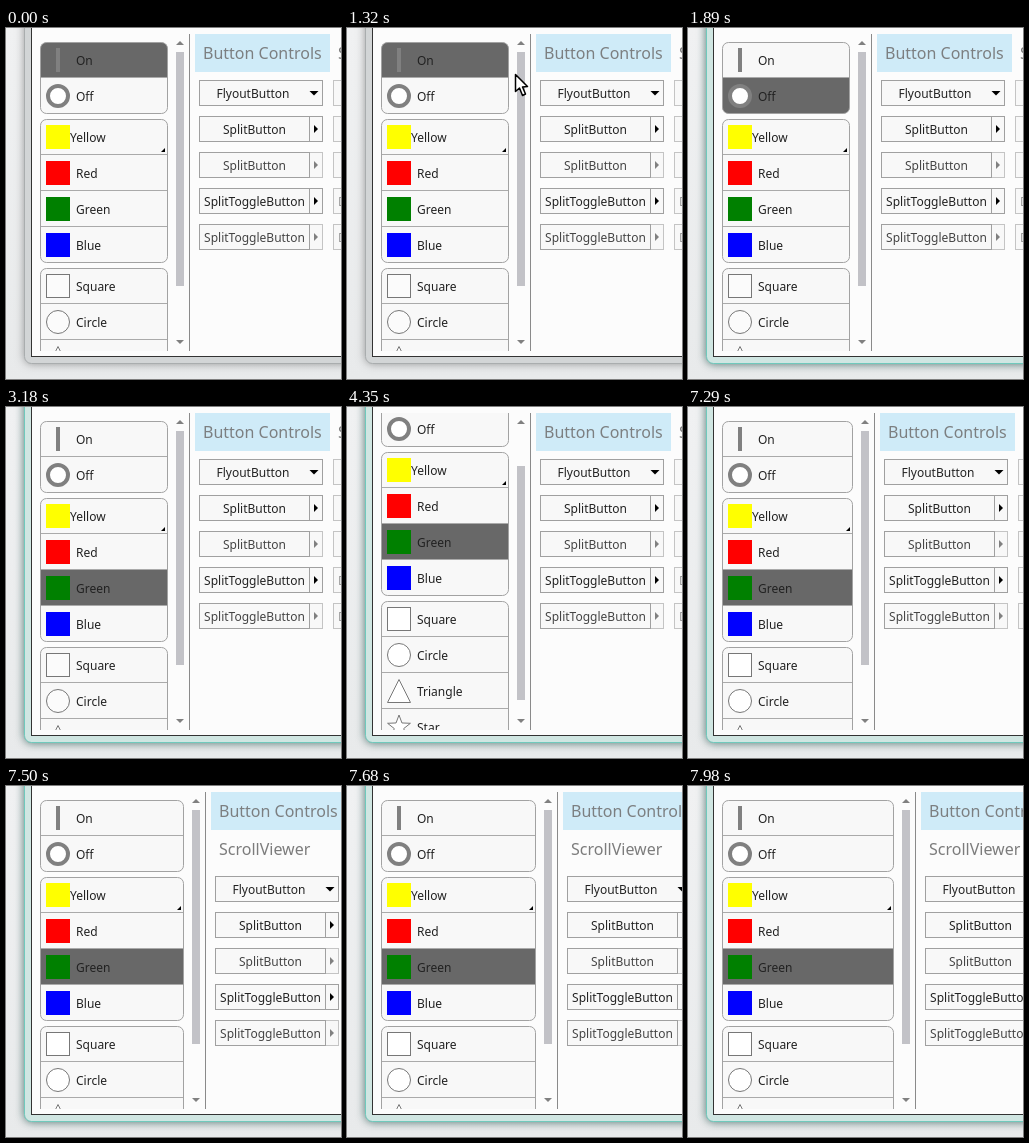
Write an HTML page with a canvas that moves like this. It is 335 px wide and 351 px high and loops after 8000 ms.

```html
<!DOCTYPE html>
<html lang="en">
<head>
<meta charset="utf-8">
<title>Control gallery</title>
<style>
  html, body { margin: 0; width: 100%; height: 100%; overflow: hidden; background: #ebedef; }
  canvas { display: block; }
</style>
</head>
<body>
<canvas id="stage" width="335" height="351"></canvas>
<script>
const ctx = document.getElementById('stage').getContext('2d');
const LOOP = 8000, TICK = 30, ROW = 36;
const FONT = '"Noto Sans", "Open Sans", sans-serif';
const INK = '#222';

const groups = [
  { top: 14, items: ['On', 'Off'] },
  { top: 91, items: ['Yellow', 'Red', 'Green', 'Blue'] },
  { top: 240, items: ['Square', 'Circle', 'Triangle', 'Star'] },
];
const swatches = { Yellow: '#ff0', Red: '#f00', Green: '#008000', Blue: '#00f' };
const buttons = [
  { label: 'FlyoutButton', flyout: true },
  { label: 'SplitButton' },
  { label: 'SplitButton', disabled: true },
  { label: 'SplitToggleButton' },
  { label: 'SplitToggleButton', disabled: true },
];

// Keys are [time, ...values]; values are interpolated linearly and held at both ends.
function track(keys, t) {
  if (t <= keys[0][0]) return keys[0].slice(1);
  for (let i = 1; i < keys.length; i++) {
    const a = keys[i - 1], b = keys[i];
    if (t < b[0]) {
      const p = (t - a[0]) / (b[0] - a[0]);
      return a.slice(1).map((v, k) => v + (b[k + 1] - v) * p);
    }
  }
  return keys[keys.length - 1].slice(1);
}

// Latest value whose start time has passed.
const latest = (keys, t) => keys.filter(k => k[0] <= t).pop()[1];

// Progress from 0 to 1 in equal jumps, the first one at the start time.
const steps = (t, start, gap, count) =>
  Math.max(0, Math.min(count, Math.floor((t - start) / gap) + 1)) / count;

function rect(x, y, w, h, fill) {
  ctx.fillStyle = fill;
  ctx.fillRect(x, y, w, h);
}

function outline(x, y, w, h, color) {
  ctx.strokeStyle = color;
  ctx.lineWidth = 1;
  ctx.strokeRect(x + .5, y + .5, w - 1, h - 1);
}

function shape(points, fill, stroke) {
  ctx.beginPath();
  points.forEach(([x, y]) => ctx.lineTo(x, y));
  ctx.closePath();
  if (fill) { ctx.fillStyle = fill; ctx.fill(); }
  if (stroke) { ctx.strokeStyle = stroke; ctx.lineWidth = 1; ctx.stroke(); }
}

function circle(x, y, r, width, stroke, fill) {
  ctx.beginPath();
  ctx.arc(x, y, r, 0, Math.PI * 2);
  if (fill) { ctx.fillStyle = fill; ctx.fill(); }
  ctx.strokeStyle = stroke;
  ctx.lineWidth = width;
  ctx.stroke();
}

function text(label, x, y, color = INK, size = 12, align = 'left') {
  ctx.font = `${size}px ${FONT}`;
  ctx.textAlign = align;
  ctx.fillStyle = color;
  ctx.fillText(label, x, y);
}

function frame(alpha, shadow, edge, strip) {
  ctx.save();
  ctx.globalAlpha = alpha;
  ctx.shadowColor = shadow;
  ctx.shadowBlur = 10;
  ctx.beginPath();
  ctx.roundRect(18.5, -20, 340, 355.5, 7);
  ctx.fillStyle = strip;
  ctx.fill();
  ctx.shadowColor = 'transparent';
  ctx.strokeStyle = edge;
  ctx.lineWidth = 1;
  ctx.stroke();
  ctx.restore();
}

function drawWindow(focus) {
  const desk = ctx.createLinearGradient(0, 0, 0, 351);
  desk.addColorStop(0, '#f0f1f2');
  desk.addColorStop(1, '#e8eaeb');
  rect(0, 0, 335, 351, desk);
  frame(1, 'rgba(0,0,0,.4)', '#a9adae', '#d2d5d6');
  if (focus) frame(focus, 'rgba(40,120,110,.5)', '#6fc9bc', '#d0e6e2');
  rect(25, 0, 310, 329, '#333');
  rect(26, 0, 309, 328, '#fcfcfc');
}

function drawIcon(name, y, solid) {
  const paper = solid ? '#fff' : '#fbfbfb';
  if (swatches[name]) rect(40, y + 6, 24, 24, swatches[name]);
  else if (name === 'On') rect(50, y + 6, 4, 24, '#808080');
  else if (name === 'Off') circle(52, y + 18, 10, 4, '#808080', '#fff');
  else if (name === 'Square') { rect(40, y + 6, 24, 24, paper); outline(40, y + 6, 24, 24, '#777'); }
  else if (name === 'Circle') circle(52, y + 18, 11.5, 1, '#777', paper);
  else if (name === 'Triangle') shape([[52, y + 6.5], [63.5, y + 29.5], [40.5, y + 29.5]], paper, '#777');
  else {
    const points = Array.from({ length: 10 }, (_, i) => {
      const r = i % 2 ? 5 : 12, a = i * Math.PI / 5;
      return [52 + r * Math.sin(a), y + 18 - r * Math.cos(a)];
    });
    shape(points, paper, '#777');
  }
}

function drawGroup({ top, items }, right, state) {
  const height = items.length * ROW;
  const border = () => {
    ctx.beginPath();
    ctx.roundRect(34.5, top + .5, right - 35, height - 1, 6);
  };
  ctx.save();
  border();
  ctx.clip();
  rect(34, top, right - 34, height, '#f8f8f8');
  items.forEach((name, i) => {
    const y = top + i * ROW;
    if (name === state.selected) rect(34, y, right - 34, ROW, '#686868');
    else if (name === state.hover) rect(34, y, right - 34, ROW, '#e6e6e6');
    if (i) rect(34, y - 1, right - 34, 1, '#aaa');
    drawIcon(name, y, state.solid);
    text(name, name === 'Yellow' ? 64 : 70, y + 23);
  });
  ctx.restore();
  border();
  ctx.strokeStyle = '#a2a2a2';
  ctx.lineWidth = 1;
  ctx.stroke();
  if (items[0] === 'Yellow') {
    const x = right - 3, y = top + 33;
    shape([[x, y - 4], [x, y], [x - 4, y]], '#000');
  }
}

function drawList(state) {
  const { shift, scroll } = state;
  ctx.save();
  ctx.beginPath();
  ctx.rect(26, 6, 309, 317);
  ctx.clip();
  ctx.save();
  ctx.translate(0, -scroll);
  groups.forEach(group => drawGroup(group, 162 + shift, state));
  ctx.restore();
  const x = 174 + shift;
  shape([[x - 4, 17], [x, 13], [x + 4, 17]], '#808080');
  shape([[x - 4, 312], [x, 316], [x + 4, 312]], '#808080');
  rect(x - 4, 24 + Math.round(scroll * .75), 8, 234, state.thumbHot ? '#a8a8ac' : '#c2c2c7');
  rect(x + 9, 6, 1, 317, '#8a8a8a');
  ctx.restore();
}

function drawButton({ label, flyout, disabled }, y) {
  const border = disabled ? '#c4c4c4' : '#a0a0a0';
  const arrow = disabled ? '#808080' : '#000';
  rect(193, y, 124, 26, '#f8f8f8');
  outline(193, y, 124, 26, border);
  if (flyout) {
    shape([[303.5, y + 11], [312.5, y + 11], [308, y + 15.5]], arrow);
  } else {
    outline(193, y, 111, 26, '#a0a0a0');
    shape([[308, y + 9], [312, y + 13], [308, y + 17]], arrow);
  }
  text(label, flyout ? 247 : 248.5, y + 18, disabled ? '#444' : INK, 12, 'center');
}

function drawPanel({ shift, wrapped }) {
  ctx.save();
  ctx.translate(shift, 0);
  rect(189, 6, 135, 38, '#cfebf8');
  text('Button Controls', 197, 31, '#7c7f81', 16);
  text('ScrollViewer', wrapped ? 197 : 332, wrapped ? 69 : 31, '#7c7c7c', 16);
  buttons.forEach((button, i) => {
    const y = 52 + i * ROW + (wrapped ? 38 : 0);
    drawButton(button, y);
    rect(327, y, 124, 26, '#f8f8f8');
    outline(327, y, 124, 26, '#c4c4c4');
    if (i > 2) text('D', 332, y + 18, '#999');
  });
  ctx.restore();
}

function drawCursor(x, y) {
  ctx.save();
  ctx.translate(x + .5, y + .5);
  ctx.lineJoin = 'round';
  shape([[0, 0], [0, 17], [4, 13.5], [7, 21], [10, 19.5], [7, 12.5], [12, 12]], '#fff');
  ctx.strokeStyle = '#000';
  ctx.lineWidth = 1.5;
  ctx.stroke();
  ctx.restore();
}

function render(t) {
  const now = Math.floor(t / TICK) * TICK;
  const state = {
    selected: latest([[0, 'On'], [1800, 'Off'], [3180, 'Green']], now),
    hover: latest([[0, ''], [1470, 'Off'], [2310, 'Yellow'], [2520, 'Red'], [2730, 'Green'], [3180, '']], now),
    solid: now >= 4260,
    scroll: Math.round(61 * (steps(t, 4260, 40, 4) - steps(t, 4740, 30, 3))),
    thumbHot: now >= 5250 && now < 5310,
    shift: now < 7290 ? 0 : Math.round(track([[7290, 3], [7680, 27], [7980, 44]], now)[0]),
    wrapped: now >= 7500,
  };
  drawWindow(steps(t, 1800, 45, 3));
  drawPanel(state);
  drawList(state);
  if (now >= 990 && now < 1560) {
    drawCursor(...track([[990, 311, 30], [1320, 168, 46], [1530, 120, 69]], now).map(Math.round));
  }
}

const start = performance.now();
function tick() {
  render((performance.now() - start) % LOOP);
  requestAnimationFrame(tick);
}
tick();
</script>
</body>
</html>
```
